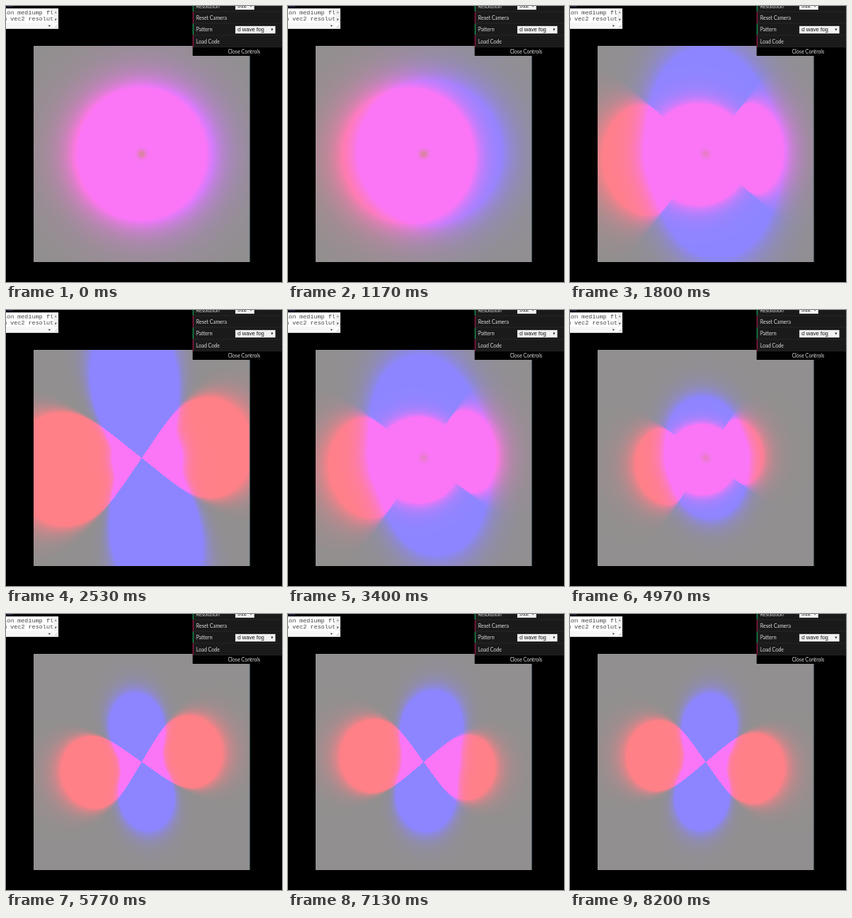
Write an HTML page with a canvas that moves like this. It is 360 by 360 pixels and loops after 8.33 s.

```html
<!DOCTYPE html>
<html lang="en">
<head>
<meta charset="utf-8">
<title>d wave fog</title>
<style>
html, body { margin: 0; width: 100%; height: 100%; overflow: hidden; background: #000; }
canvas { display: block; width: 360px; height: 360px; }
</style>
</head>
<body>
<canvas id="stage" width="360" height="360"></canvas>
<script>
const ctx = document.getElementById('stage').getContext('2d');
const LOOP = 8330, SIZE = 282, LEFT = 36, TOP = 52, CX = 177, CY = 193;
const BINS = 1440, RAD = Math.PI / 180;

// time, red size/shift/direction, blue size/shift/direction,
// lobe amount, red tilt, blue tilt, blue waist, blue sharpness, edge falloff
const KEYS = [
  [0,    86, 2, 180,   88, 5, 0,    0, 0, 0,    .3, 3, 4],
  [1170, 86, 20, 187,  94, 8, 15,   0, 4, 4,    .3, 3, 4.5],
  [2530, 157, 12, 180, 190, 30, 0,  1, 8.5, 8,  .24, 5, 7],
  [4270, 64, 17, 225,  71, 4, 35,   0, 10, 8,   .3, 3, 5],
  [5770, 106, 0, 180,  90, 0, 0,    1, 12, 8,   .31, 3, 7.5],
  [7130, 101, 8, 180,  91, 22, 0,   1, -7, -5,  .41, 3, 7.5],
  [8200, 103, 0, 180,  89, 0, 0,    1, -7.5, -6, .31, 3, 7.5]
];

function stateAt(t) {
  let i = 0;
  while (i < KEYS.length - 2 && t > KEYS[i + 1][0]) i++;
  const a = KEYS[i], b = KEYS[i + 1];
  const u = Math.min(1, (t - a[0]) / (b[0] - a[0]));
  const e = u * u * (3 - 2 * u);
  return a.map((v, j) => v + (b[j] - v) * e);
}

// polar coordinates of each pixel, computed once
const radius = new Float32Array(SIZE * SIZE);
const bin = new Uint16Array(SIZE * SIZE);
for (let y = 0, p = 0; y < SIZE; y++) {
  for (let x = 0; x < SIZE; x++, p++) {
    const dx = x + .5 + LEFT - CX, dy = CY - y - .5 - TOP;
    radius[p] = Math.hypot(dx, dy);
    bin[p] = Math.floor((Math.atan2(dy, dx) / (2 * Math.PI) + 1) * BINS) % BINS;
  }
}

const fog = ctx.createImageData(SIZE, SIZE);
const redEdge = new Float32Array(BINS), blueEdge = new Float32Array(BINS);
const level = (r, edge, k) => r <= edge ? 1 : Math.exp(k * (1 - r / edge));

function drawFog(t) {
  const [, rs, rc, ra, bs, bc, ba, lobes, rTilt, bTilt, waist, power, k] = stateAt(t);
  for (let i = 0; i < BINS; i++) {
    const a = (i + .5) / BINS * 2 * Math.PI;
    const c = Math.cos(2 * (a - rTilt * RAD));
    const redShape = Math.pow(Math.max(0, (c + .08) / 1.08), .28);
    const s = Math.abs(Math.sin(a - bTilt * RAD));
    const blueShape = waist + (1 - waist) * Math.pow(s, power);
    redEdge[i] = .01 + (rs + rc * Math.cos(a - ra * RAD)) * (1 - lobes + lobes * redShape);
    blueEdge[i] = (bs + bc * Math.cos(a - ba * RAD)) * (1 - lobes + lobes * blueShape);
  }
  const d = fog.data;
  for (let p = 0, q = 0; p < radius.length; p++, q += 4) {
    const r = radius[p];
    let red = level(r, redEdge[bin[p]], k), blue = level(r, blueEdge[bin[p]], k);
    if (r < 14) {
      const core = (1 - lobes) * Math.exp(-r * r / 30);
      red *= 1 - .35 * core;
      blue *= 1 - .85 * core;
    }
    d[q] = 145 + 110 * red - 5 * blue;
    d[q + 1] = 143 - 15 * red - 10 * blue;
    d[q + 2] = 143 - 8 * red + 112 * blue;
    d[q + 3] = 255;
  }
  ctx.putImageData(fog, LEFT, TOP);
  box(317.5, TOP, .8, SIZE, '#587078');
}

function box(x, y, w, h, color) {
  ctx.fillStyle = color;
  ctx.fillRect(x, y, w, h);
}

function text(str, x, y, font, color, align = 'left') {
  ctx.font = font;
  ctx.textAlign = align;
  ctx.fillStyle = color;
  ctx.fillText(str, x, y);
}

function arrow(x, y, dx, dy, color) {
  ctx.fillStyle = color;
  ctx.beginPath();
  ctx.moveTo(x + dx, y + dy);
  ctx.lineTo(x - dx + dy, y - dy + dx);
  ctx.lineTo(x - dx - dy, y - dy - dx);
  ctx.fill();
}

function select(label, x, y, w) {
  box(x, y, w, 10, '#aaa');
  box(x + .5, y + .5, w - 1, 9, '#f2f2f2');
  text(label, x + 3, y + 7.4, '7.2px "Liberation Sans", Arial, sans-serif', '#111');
  arrow(x + w - 4.5, y + 5, 0, 1.4, '#222');
}

function drawEditor() {
  const mono = '7.8px "Liberation Mono", "Courier New", monospace';
  box(1, 0, 8, 1, '#2a2058');
  box(0, 3, 68.5, 27, '#999');
  box(0, 3.5, 68, 26, '#fff');
  ctx.save();
  ctx.beginPath();
  ctx.rect(0, 3, 61.5, 19);
  ctx.clip();
  text('ion mediump float', -3.7, 11.4, mono, '#444');
  text('m vec2 resolution', -3.7, 19.4, mono, '#444');
  ctx.restore();
  box(61.5, 4, 6.5, 18, '#f1f1f1');
  box(0, 22, 61.5, 7, '#f6f6f6');
  arrow(64.8, 8, 0, -1.2, '#777');
  arrow(64.8, 18, 0, 1.2, '#333');
  arrow(57, 25.8, 1.2, 0, '#333');
  ctx.strokeStyle = '#888';
  ctx.lineWidth = .6;
  ctx.beginPath();
  ctx.moveTo(63, 28.5); ctx.lineTo(67, 24.5);
  ctx.moveTo(65.3, 28.5); ctx.lineTo(67, 26.8);
  ctx.stroke();
}

function drawPanel() {
  const font = '6.6px Lato, "Open Sans", sans-serif';
  box(243.5, 0, 116.5, 65, '#000');
  box(244, 0, 116, 53.5, '#1a1a1a');
  const rows = ['Resolution', 'Reset Camera', 'Pattern', 'Load Code'];
  rows.forEach((name, i) => {
    const y = -7.8 + i * 15.3;
    box(244, y + 15, 116, .6, '#2c2c2c');
    box(243.5, y, 1.2, 15, i % 2 ? '#a01c48' : '#1e9a58');
    text(name, 248, y + 10.4, font, '#ddd');
  });
  select('512', 299, -5, 25);
  select('d wave fog', 299, 26, 52.5);
  text('Close Controls', 310.5, 61.6, font, '#ddd', 'center');
}

function frame(now) {
  box(0, 0, 360, 360, '#000');
  drawFog(now % LOOP);
  drawEditor();
  drawPanel();
  requestAnimationFrame(frame);
}
frame(0);
</script>
</body>
</html>
```
